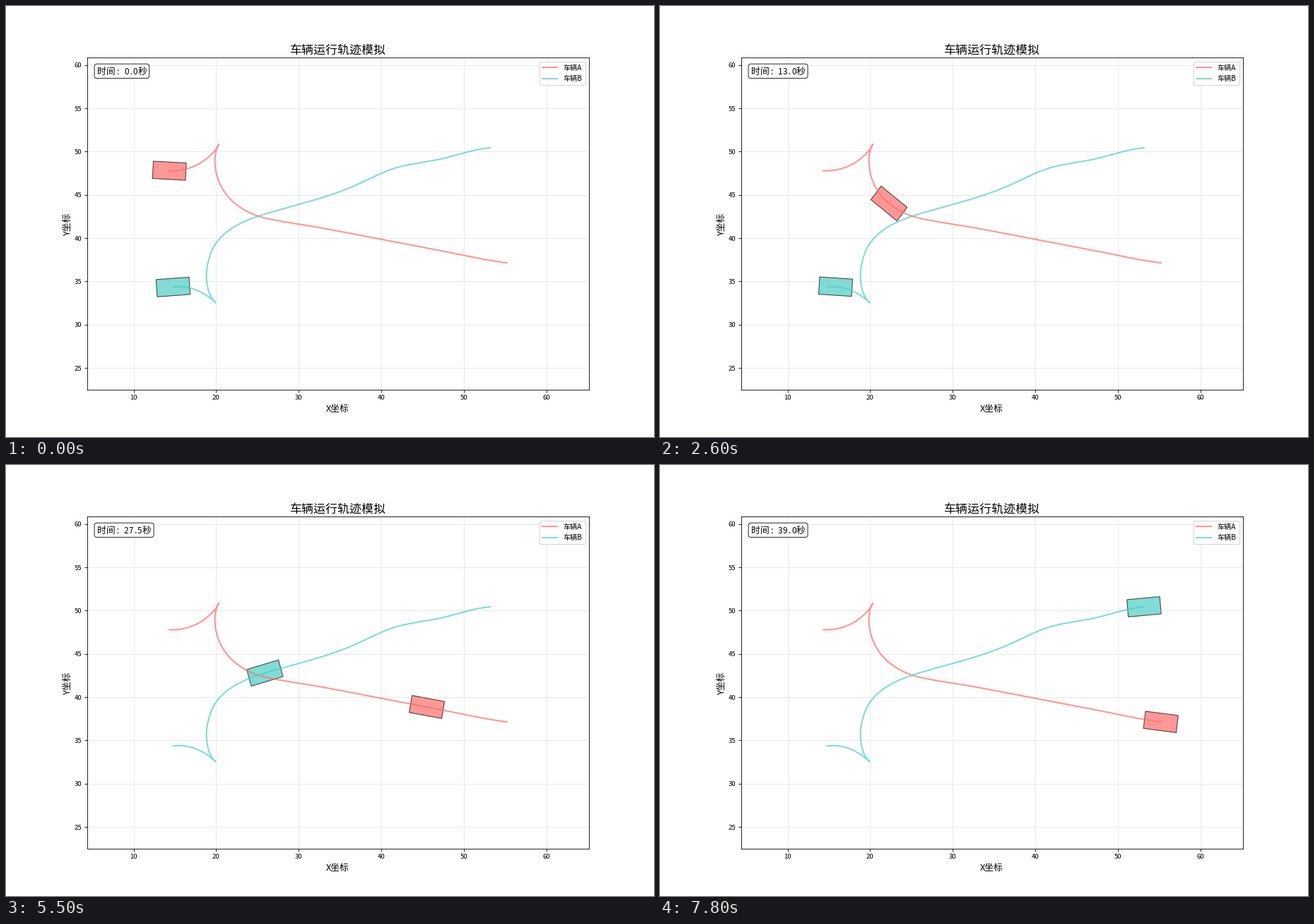
Write a matplotlib script that moves like this. It is 917 by 611 pixels and loops after 7.9 s.

```python
import numpy as np
import matplotlib.pyplot as plt
from matplotlib.animation import FuncAnimation
from matplotlib.patches import FancyBboxPatch, Polygon
from matplotlib.transforms import Affine2D

W, H, DPI = 917, 611, 76.4
FRAMES, STEP_MS = 79, 100
XLIM, YLIM = (4.345, 65.2), (22.49, 60.85)
CAR_LENGTH, CAR_WIDTH = 4, 2
RED, TEAL = "#FF6B6B", "#4ECDC4"

plt.rcParams["font.family"] = "Noto Sans CJK JP"


def hermite(p, q, m, n, u):
    """Cubic from p to q with end tangents m and n, at u in 0..1."""
    return ((1 + 2 * u) * (1 - u) ** 2 * p + u * (1 - u) ** 2 * m
            + u * u * (3 - 2 * u) * q - u * u * (1 - u) * n)


def arc(a, b, count=400):
    """Nearly circular curve between two poses (step, x, y, heading)."""
    p, q = np.array(a[1:3]), np.array(b[1:3])
    ha, hb = np.radians([a[3], b[3]])
    size = np.hypot(*(q - p)) / np.cos((hb - ha) / 4) ** 2
    m, n = (size * np.array([np.cos(h), np.sin(h)]) for h in (ha, hb))
    return hermite(p, q, m, n, np.linspace(0, 1, count)[:, None])


class Leg:
    """A drive through poses, starting and ending at rest."""

    def __init__(self, poses):
        arcs = [arc(a, b) for a, b in zip(poses, poses[1:])]
        self.path = np.concatenate([arcs[0]] + [c[1:] for c in arcs[1:]])
        d = np.gradient(self.path, axis=0)
        self.angle = np.unwrap(np.arctan2(d[:, 1], d[:, 0]))
        self.dist = np.r_[0, np.cumsum(np.hypot(*np.diff(self.path, axis=0).T))]

        # distance at each pose, with speeds that never overshoot
        self.t = np.array([p[0] for p in poses], float)
        self.s = self.dist[::len(arcs[0]) - 1]
        v = np.diff(self.s) / np.diff(self.t)
        self.speed = np.r_[0, 2 * v[:-1] * v[1:] / (v[:-1] + v[1:]), 0]

    def pose(self, step):
        t = np.clip(step, self.t[0], self.t[-1])
        k = min(np.searchsorted(self.t, t, side="right"), len(self.t) - 1) - 1
        h = self.t[k + 1] - self.t[k]
        s = hermite(self.s[k], self.s[k + 1], h * self.speed[k],
                    h * self.speed[k + 1], (t - self.t[k]) / h)
        return [np.interp(s, self.dist, v) for v in (*self.path.T, self.angle)]


class Car:
    def __init__(self, ax, name, color, *legs):
        self.legs = [Leg(poses) for poses in legs]
        path = np.concatenate([leg.path for leg in self.legs])
        ax.plot(*path.T, color=color, lw=2, alpha=0.7, label=name)
        self.body = Polygon(self.corners(0), closed=True, facecolor=color,
                            edgecolor="black", lw=1, alpha=0.7)
        ax.add_patch(self.body)

    def corners(self, step):
        started = [leg for leg in self.legs if leg.t[0] <= step]
        x, y, a = (started or self.legs[:1])[-1].pose(step)
        along = CAR_LENGTH / 2 * np.array([np.cos(a), np.sin(a)])
        side = CAR_WIDTH / 2 * np.array([-np.sin(a), np.cos(a)])
        return np.array([x, y]) + [along + side, along - side,
                                   -along - side, -along + side]

    def move(self, step):
        self.body.set_xy(self.corners(step))


# The tiny surplus keeps the pixel size from rounding down
fig, ax = plt.subplots(figsize=((W + 1e-6) / DPI, (H + 1e-6) / DPI), dpi=DPI)
fig.subplots_adjust(left=0.125, right=0.9, bottom=0.11, top=0.88)
px = Affine2D().scale(1 / W, -1 / H).translate(0, 1) + fig.transFigure


def label(x, y, text, size, rotation=0):
    """Text centred on a stage pixel."""
    drop = 0.38 * size * DPI / 72
    if rotation:
        x += drop
    else:
        y += drop
    return fig.text(x, y, text, fontsize=size, transform=px, ha="center",
                    va="baseline", rotation=rotation, rotation_mode="anchor")


# Poses: step, x, y, travel direction in degrees
cars = [
    Car(ax, "车辆A", RED,
        [(0, 14.33, 47.79, -3), (11, 19.82, 50.10, 49), (13.5, 20.31, 50.85, 60)],
        [(13.5, 20.31, 50.85, 240), (17.5, 19.84, 48.97, 270),
         (26, 22.28, 44.00, 322), (32, 26.04, 42.29, 348),
         (44, 33.01, 41.13, 350), (55, 45.53, 38.86, 350),
         (64, 55.22, 37.13, 353)]),
    Car(ax, "车辆B", TEAL,
        [(22.5, 14.78, 34.35, 4), (26, 15.81, 34.39, -3.5), (34.5, 19.94, 32.53, -42)],
        [(34.5, 19.94, 32.53, 138), (40.5, 18.82, 35.76, 90),
         (44, 19.24, 37.96, 72), (55, 25.90, 42.78, 16),
         (64, 37.48, 46.36, 24), (68, 42.15, 48.22, 14),
         (72, 47.11, 49.12, 12), (78, 53.18, 50.44, 5)]),
]

ax.set_xlim(*XLIM)
ax.set_ylim(*YLIM)
ax.grid(True, alpha=0.3)
ax.tick_params(labelsize=9)
ax.legend(loc="upper right", fontsize=9.5, handlelength=2.1, handletextpad=0.84,
          borderpad=0.42, labelspacing=0.53, borderaxespad=0.53)

label(469.8, 61.3, "车辆运行轨迹模拟", 16)
label(469.5, 570, "X坐标", 12)
label(86, 309.5, "Y坐标", 12, rotation=90)

# Clock: full-width signs take one em, the others half an em
EM = 12 * DPI / 72
CLOCK_X, CLOCK_Y = 128.9, 92.3
box = FancyBboxPatch((CLOCK_X, CLOCK_Y - EM / 2), 5.5 * EM, EM,
                     boxstyle="round,pad=3.8", facecolor="white",
                     edgecolor="black", lw=1, alpha=0.8, transform=px)
fig.add_artist(box)
cells = [label(CLOCK_X, CLOCK_Y, "", 12) for _ in range(9)]


def show_clock(seconds):
    text = f"时间: {seconds:.1f}秒"
    x = CLOCK_X
    for cell in cells:
        cell.set_text("")
    for cell, ch in zip(cells, text):
        step = EM / 2 if ch.isascii() else EM
        cell.set_text(ch.strip())
        cell.set_fontsize(11 if ch.isascii() else 12)
        cell.set_x(x + step / 2)
        x += step
    box.set_width(x - CLOCK_X)


def update(i):
    for car in cars:
        car.move(i)
    show_clock(i * 0.5)
    return [car.body for car in cars] + cells + [box]


anim = FuncAnimation(fig, update, frames=FRAMES, interval=STEP_MS, repeat=True,
                     repeat_delay=0, blit=False)
plt.show()
```
